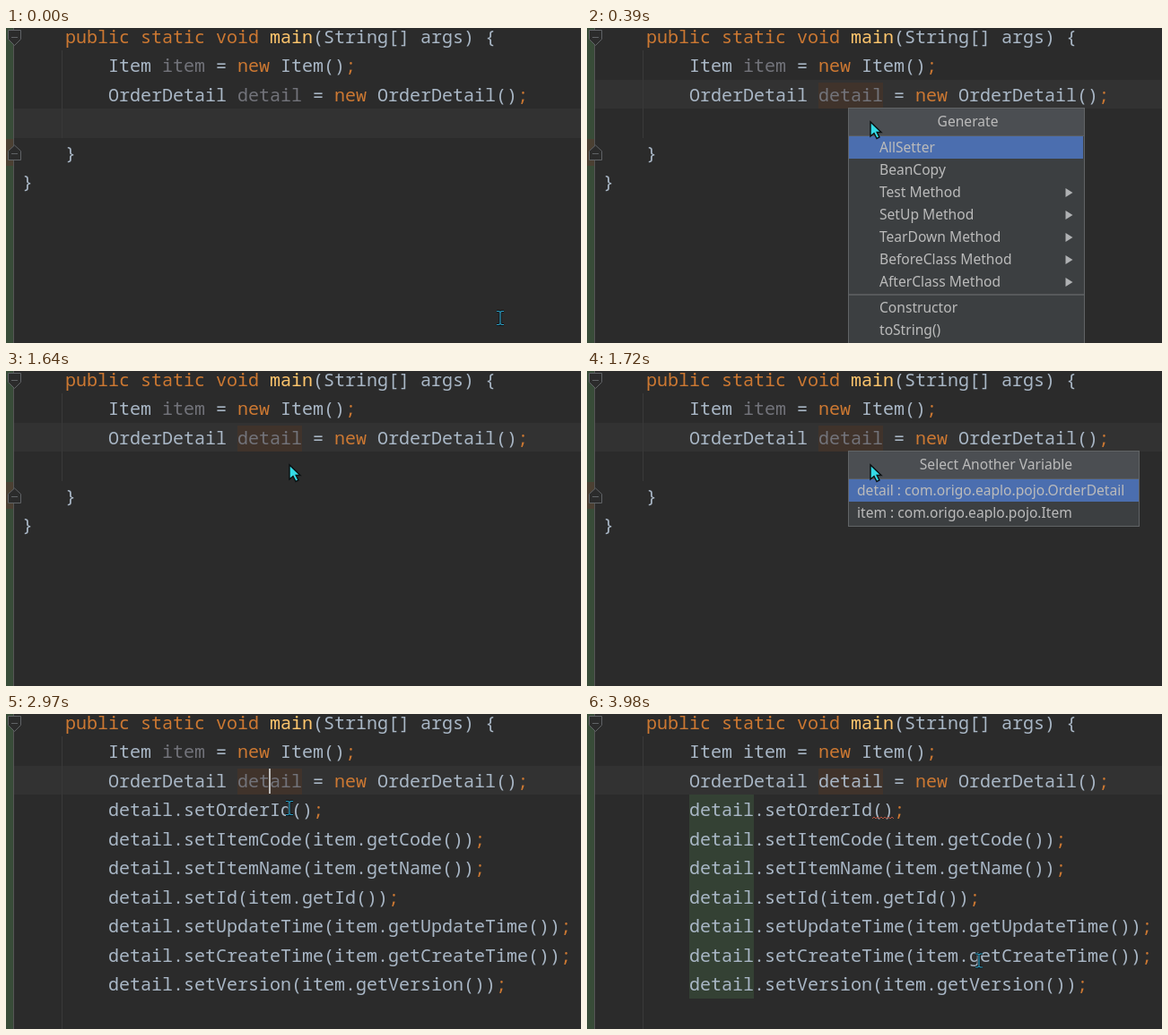
Animation, 641 px wide and 352 px high, one loop 4.07 s. Source, as an HTML page:

```html
<!DOCTYPE html>
<html lang="en">
<head>
<meta charset="utf-8">
<title>Generate menu demo</title>
<style>
  html, body { margin: 0; width: 100%; height: 100%; overflow: hidden; background: #2b2b2b; }
  svg { display: block; width: 641px; height: 352px; }
  text { white-space: pre; }
  .code { font: 20px "Noto Sans Mono", "DejaVu Sans Mono", monospace; fill: #a9b7c6; }
  .menu { font: 15.6px "Noto Sans", "Open Sans", sans-serif; fill: #bbbbbb; }
  .kw { fill: #cc7832; }
  .fn { fill: #ffc66d; }
  .unused { fill: #72737a; }
</style>
</head>
<body>
<svg id="stage" viewBox="0 0 641 352"></svg>
<script>
const LOOP = 4070;
const stage = document.getElementById('stage');

const rect = (x, y, w, h, fill) =>
  `<rect x="${x}" y="${y}" width="${w}" height="${h}" fill="${fill}"/>`;
const path = (d, stroke, width = 1, fill = 'none') =>
  `<path d="${d}" stroke="${stroke}" stroke-width="${width}" fill="${fill}"/>`;

// Visible from `from` until `to`, in ms
const during = (from, to, content) =>
  `<g data-from="${from}" data-to="${to}">${content}</g>`;

const baseline = row => 17 + 32.45 * row;
const colour = source => source
  .replace(/\b(public|static|void|new)\b|;/g, '<tspan class=kw>$&</tspan>')
  .replace(/\bmain\b/, '<tspan class=fn>$&</tspan>')
  .replace(/~(\w+)/g, '<tspan class=unused>$1</tspan>');
const line = (row, indent, source) =>
  `<text class="code" x="${18 + indent * 48}" y="${baseline(row)}">${colour(source)}</text>`;

const label = (x, y, string, anchor = 'start') =>
  `<text class="menu" x="${x}" y="${y}" text-anchor="${anchor}">${string}</text>`;

function popup(width, height, title, titleX, body) {
  return rect(291, 89, width, height, '#616466') +
    rect(292, 90, width - 2, height - 2, '#3c3f41') +
    rect(292, 90, width - 2, 30, '#4b4e52') +
    rect(292, 120, width - 2, 1, '#5a5d60') +
    label(titleX, 110, title, 'middle') + body;
}
const selection = (index, width) => rect(292, 121 + 25 * index, width, 25, '#4b6eaf');

const foldStart = path('M2.5 2.5H16.5V12.5L9.5 19.5L2.5 12.5ZM6 10.5H13', '#606366', 1, '#2b2b2b');
const foldEnd = path('M9.5 131L16.5 137.5V147.5H2.5V137.5ZM6 140.5H13', '#606366', 1, '#2b2b2b');

function generateMenu() {
  const items = ['AllSetter', 'BeanCopy', 'Test Method', 'SetUp Method',
    'TearDown Method', 'BeforeClass Method', 'AfterClass Method'];
  const rows = items.map((item, i) => {
    const y = 133.5 + 25 * i;
    const arrow = i > 1 ? `<path d="M533.5 ${y - 4.5}L541.5 ${y + .5}L533.5 ${y + 5.5}Z" fill="#afb1b3"/>` : '';
    return label(326, y + 5.5, item) + arrow;
  }).join('');
  return popup(264, 270, 'Generate', 424.5,
    during(390, 1110, selection(0, 261)) + during(1110, 1640, selection(1, 261)) +
    rows + rect(292, 297, 262, 2, '#57595b') +
    label(326, 318, 'Constructor') + label(326, 343, 'toString()'));
}

const variableMenu = () => popup(325, 85, 'Select Another Variable', 456,
  during(1720, 2330, selection(0, 323)) + during(2330, 2890, selection(1, 323)) +
  label(301, 139, 'detail : com.origo.eaplo.pojo.OrderDetail') +
  label(301, 164, 'item : com.origo.eaplo.pojo.Item'));

const declarations = mark =>
  line(1, 2, `Item ${mark}item = new Item();`) +
  line(2, 2, `OrderDetail ${mark}detail = new OrderDetail();`);

const setters = ['setOrderId()', 'setItemCode(item.getCode())', 'setItemName(item.getName())',
  'setId(item.getId())', 'setUpdateTime(item.getUpdateTime())',
  'setCreateTime(item.getCreateTime())', 'setVersion(item.getVersion())'];

const squiggle = path('M318 117' + 'l2 -2l2 2'.repeat(6), '#b5533f', 1);

const beamShape = 'M-4 -7.5H-1.5L0 -6.5L1.5 -7.5H4M0 -6.5V6.5M-4 7.5H-1.5L0 6.5L1.5 7.5H4';
const beam = path(beamShape, '#101315', 3) + path(beamShape, '#2f9fc4', 1.2);
const arrow = path('M0 0V16L4 12.5L7 18.5L10 17L7.2 11.5H12Z', '#0b1012', 1.4, '#35dbe6');

stage.innerHTML =
  rect(0, 0, 641, 352, '#2b2b2b') +
  during(0, 230, rect(9, 90, 632, 33, '#323232')) +
  during(230, LOOP, rect(9, 58, 632, 32, '#323232')) +
  rect(0, 0, 8, 352, '#384c38') +
  during(0, 2970, rect(0, 124, 8, 30, '#4b4032')) +
  rect(8, 0, 1, 352, '#555555') +
  during(0, 2970, rect(62, 25, 1, 98, '#393939')) +
  during(2970, LOOP, rect(62, 25, 1, 327, '#393939')) +
  foldStart +
  during(310, LOOP, rect(258, 61, 72, 29, '#40332b')) +
  during(3290, LOOP, rect(114, 90, 72, 228, '#344134')) +
  line(0, 1, 'public static void main(String[] args) {') +
  during(0, 3290, declarations('~')) +
  during(3290, LOOP, declarations('')) +
  during(0, 2970, foldEnd + line(4, 1, '}') + line(5, 0, '}')) +
  during(2970, LOOP, setters.map((call, i) => line(3 + i, 2, `detail.${call};`)).join('')) +
  during(3380, LOOP, squiggle) +
  during(230, 390, rect(293, 61, 2, 28, '#bbbbbb')) +
  during(2970, 3900, rect(293, 61, 2, 28, '#bbbbbb')) +
  during(390, 1640, generateMenu()) +
  during(1720, 2890, variableMenu()) +
  `<g id="pointer">${during(0, 390, beam)}${during(390, 2970, arrow)}${during(2970, LOOP, beam)}</g>`;

// Time, x, y
const pointerSteps = [
  [0, 551, 324], [70, 480, 250], [150, 380, 150], [230, 296, 79], [310, 316, 105],
  [3900, 390, 205], [3980, 437, 275.5]
];
const pointer = document.getElementById('pointer');
const timed = [...stage.querySelectorAll('[data-from]')];

function draw() {
  const t = performance.now() % LOOP;
  for (const part of timed) {
    const on = t >= part.dataset.from && t < part.dataset.to;
    part.setAttribute('display', on ? 'inline' : 'none');
  }
  const [, x, y] = pointerSteps.findLast(step => step[0] <= t);
  pointer.setAttribute('transform', `translate(${x} ${y})`);
  requestAnimationFrame(draw);
}
draw();
</script>
</body>
</html>
```
